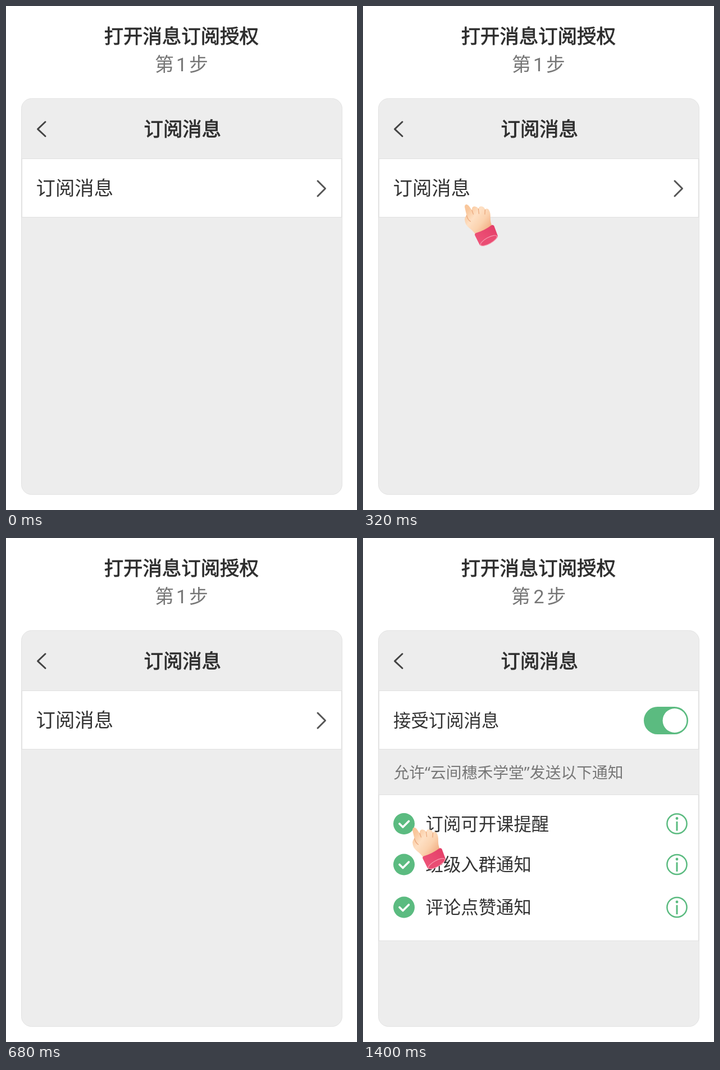
Animation of 625 by 896 pixels, one loop 1.8 s. Source, as an HTML page:

```html
<!DOCTYPE html>
<html lang="zh-CN">
<head>
<meta charset="utf-8">
<style>
  html, body { margin: 0; width: 100%; height: 100%; overflow: hidden; background: #fff; }
  svg { display: block; width: 625px; height: 896px; }
  text { font-family: "Noto Sans CJK SC", "Noto Sans CJK", "Noto Sans", sans-serif; fill: #333; }
  .mid { text-anchor: middle; }
  .medium { font-size: 34.4px; fill: #2e2e2e; stroke: #2e2e2e; stroke-width: .85px; }
  .label { font-size: 34.4px; }
  .item { font-size: 31.4px; }
  .step { font-size: 34px; fill: #777; }
  .digit { font-family: Roboto, sans-serif; }
  .note { font-family: "Noto Sans", "Noto Sans CJK SC", "Noto Sans CJK", sans-serif; font-size: 27.8px; fill: #777; }
  .line { fill: none; stroke-linecap: round; stroke-linejoin: round; }
</style>
</head>
<body>
<svg viewBox="0 0 625 896">
  <defs>
    <linearGradient id="skin" x1="0" y1=".3" x2=".8" y2="1">
      <stop offset="0" stop-color="#f9c79c"/>
      <stop offset=".3" stop-color="#fee0c4"/>
      <stop offset=".6" stop-color="#fbd2ae"/>
      <stop offset="1" stop-color="#f0a67a"/>
    </linearGradient>
    <linearGradient id="cuff" x1="0" y1="1" x2="1" y2="0">
      <stop offset="0" stop-color="#f0587c"/>
      <stop offset="1" stop-color="#e33c66"/>
    </linearGradient>
  </defs>

  <rect width="625" height="896" fill="#fff"/>
  <text class="medium mid" x="312.3" y="65.7">打开消息订阅授权</text>
  <rect x="27.5" y="164.5" width="571" height="704" rx="18" fill="#ededed" stroke="#e3e3e3"/>
  <path class="line" d="M70 206L56.500 218.800L70 231.500" stroke="#444" stroke-width="3"/>
  <text class="medium mid" x="314.3" y="231.2">订阅消息</text>
  <rect x="28.5" y="271.5" width="569" height="104" fill="#fff" stroke="#e0e0e0"/>

  <g id="first">
    <g class="mid">
      <text class="step" x="282" y="116">第</text>
      <text class="step digit" x="312.5" y="116">1</text>
      <text class="step" x="343" y="116">步</text>
    </g>
    <text class="label" x="53.5" y="336.3">订阅消息</text>
    <path class="line" d="M555 311L568.5 324.5L555 338" stroke="#555" stroke-width="3"/>
  </g>

  <g id="second">
    <g class="mid">
      <text class="step" x="281" y="116">第</text>
      <text class="step digit" x="313" y="116">2</text>
      <text class="step" x="344.5" y="116">步</text>
    </g>
    <text class="item" x="54" y="335.5">接受订阅消息</text>
    <rect x="500" y="300" width="79" height="49" rx="24.5" fill="#5bbb80"/>
    <circle cx="555" cy="324.5" r="21.4" fill="#fff"/>
    <text class="note" x="54.5" y="427.3">允许“云间穗禾学堂”发送以下通知</text>
    <rect x="28.5" y="456.5" width="569" height="259.5" fill="#fff" stroke="#e0e0e0"/>
    <g id="items"></g>
  </g>

  <g id="hand">
    <path d="M1.500 5Q2 0 6 .8Q9 2 11 6L14.500 11Q14 4.500 19 4.200Q24 4.500 26 8.500Q27 3.500 32 4.200Q37 5.500 38 10Q40 6.500 44 9.500Q48 14 47.500 26Q47.500 33 51 41L23 57Q18 49 9 42Q2 36 2 29Q1 24 5 20Z" fill="url(#skin)"/>
    <path class="line" d="M14.500 11L17 18M26 8.500L27 17M38 10L37.500 18M5 20Q7 28 12 31" stroke="#e9a579" stroke-width="1.200"/>
    <path d="M20 56Q18.500 53 22 51.500Q37 47 49 38Q52 36 54 39L60.500 56.500Q61 61 51 67Q40 74 31 74Q28.500 74 28 72Z" fill="url(#cuff)"/>
    <ellipse cx="44.500" cy="65" rx="16.500" ry="5.500" transform="rotate(-29 44.500 65)" fill="#ea4d73" stroke="#f79bb0" stroke-width="1.200"/>
  </g>
</svg>
<script>
const LOOP = 1800, STEP = 40, SWITCH = 1040;
const $ = id => document.getElementById(id);
const clamp = v => Math.max(0, Math.min(1, v));
const progress = (t, from, to) => clamp((t - from) / (to - from));
const smooth = u => u * u * (3 - 2 * u);

const item = (label, y) => `
  <g transform="translate(0 ${y})">
    <circle cx="73" r="19" fill="#5bbb80"/>
    <path class="line" d="M65 0L71 6L81.5 -4.500" stroke="#fff" stroke-width="3.600"/>
    <text class="item" x="111.5" y="11.5">${label}</text>
    <circle cx="559" r="17.600" fill="none" stroke="#5bbb80" stroke-width="2.500"/>
    <circle cx="559" cy="-9.500" r="2.400" fill="#5bbb80"/>
    <path d="M559 -4V12.500" stroke="#5bbb80" stroke-width="3"/>
  </g>`;
$("items").innerHTML = item("订阅可开课提醒", 508) + item("班级入群通知", 580.5) + item("评论点赞通知", 656.5);

function placeHand(x, y, opacity, scale = 1) {
  $("hand").setAttribute("transform", `translate(${x} ${y}) translate(60 74) scale(${scale}) translate(-60 -74)`);
  $("hand").setAttribute("opacity", opacity);
}

function draw(time) {
  const t = Math.floor(time / STEP) * STEP;
  const onSecond = t >= SWITCH;
  $("first").style.display = onSecond ? "none" : "";
  $("second").style.display = onSecond ? "" : "none";

  if (onSecond) {
    const tap = Math.sin(Math.PI * progress(t, 1240, 1400));
    placeHand(86.5, 514, t >= 1240 ? 1 : 0, 1 + 0.04 * tap);
  } else {
    const away = 1 - smooth(progress(t, 80, 360));
    const fade = progress(t, 40, 300) * (1 - progress(t, 600, 680));
    placeHand(174 + 98 * away, 349 + 56 * away, fade);
  }
}

const start = performance.now();
function tick() {
  draw((performance.now() - start) % LOOP);
  requestAnimationFrame(tick);
}
tick();
</script>
</body>
</html>
```
